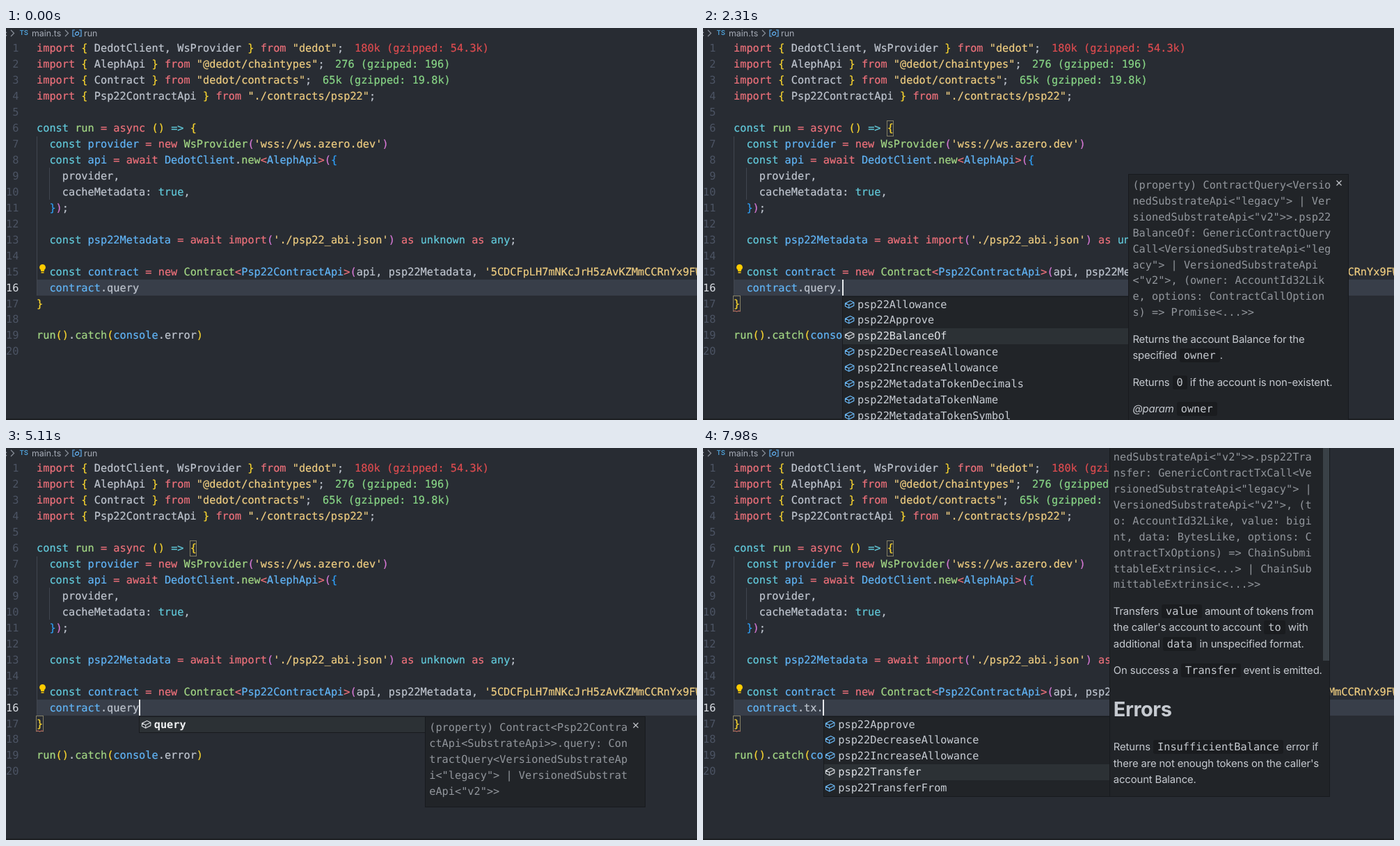
Write an HTML page that moves like this. It is 993 px wide and 564 px high and loops after 8 s.

```html
<!DOCTYPE html>
<html lang="en">
<head>
<meta charset="utf-8">
<title>Contract autocompletion</title>
<style>
html, body { margin: 0; width: 100%; height: 100%; overflow: hidden; background: #282c33; }
#stage { position: relative; width: 993px; height: 564px; overflow: hidden; background: #282c33; color: #bfc5cf;
  font: 15.28px/22.95px "DejaVu Sans Mono", "Liberation Mono", monospace; text-rendering: geometricPrecision; font-variant-ligatures: none; }
#stage div, #stage svg.abs { position: absolute; }
.row, .l { white-space: pre; height: 22.95px; }
.row { left: 44px; -webkit-text-stroke: .2px; }
.num { left: 0; width: 18.4px; text-align: right; color: #4c5464; }
.num.on { color: #d8dce2; }
i { font-style: normal; }
.r { color: #ee717b; } .c { color: #62cadb; } .b { color: #61b5f7; } .g { color: #a2d684; }
.y { color: #efcd80; } .o { color: #fad62f; } .p { color: #d678d5; } .u { color: #2f9ff6; }
.bad { color: #de4c50; } .ok { color: #88d686; }
.guide { width: 1px; background: #41464f; }
#now { left: 44px; right: 0; top: 362px; height: 23px; background: #383e49; }
#word { left: 145.2px; width: 46px; top: 362px; height: 23px; background: #484f5c; }
.match { width: 8.5px; height: 21px; border: 1px solid #858065; }
#caret { width: 2px; height: 22.5px; top: 362.3px; background: #e8eaed; }
#edge { left: 0; right: 0; bottom: 0; height: 2px; background: #1c1e22; }
#crumbs { left: 0; top: 0; height: 15px; font: 12.4px/15px Inter, "Open Sans", sans-serif; color: #a5abb6; }
#crumbs div { white-space: pre; top: 0; }
.pop { background: #212428; border: 1px solid #181a1e; box-sizing: border-box; overflow: hidden; }
#list { top: 385.5px; width: 412px; }
.item { left: 0; width: 100%; height: 22.95px; color: #c8cdd4; white-space: pre; }
.item.on { background: #2c3135; color: #dfe2e6; }
.item div { left: 20.5px; top: 0; }
.item svg { position: absolute; left: 1.5px; top: 3px; fill: none; stroke: #6bb8f5; stroke-width: 1.2; stroke-linejoin: round; }
.item.on svg { stroke: #d5d8dc; }
.item b { color: #f0f1f3; }
#info { width: 317px; }
.l { left: 5px; color: #c6cad0; font: 14.9px/22.95px Inter, "Open Sans", sans-serif; letter-spacing: -.15px; }
.l.sig { color: #92969c; font: inherit; letter-spacing: 0; }
.l.head { font-weight: 700; font-size: 29px; letter-spacing: -.5px; }
.l code { font: 15.28px "DejaVu Sans Mono", monospace; letter-spacing: 0; padding: 1px 6px; border-radius: 3px; background: #1a1c1f; }
#bar { right: 0; top: 0; width: 9px; background: #3a4147; }
</style>
</head>
<body>
<div id="stage">
  <div id="now"></div>
  <div id="word"></div>
  <div class="guide" style="left:44px;top:155.5px;height:229px"></div>
  <div class="guide" style="left:62px;top:201px;height:46px"></div>
  <div id="code"></div>
  <div class="match" style="left:263.7px;top:132.5px"></div>
  <div class="match" style="left:43px;top:385px"></div>
  <svg class="abs" id="squiggle" style="left:43px;top:404px" width="11" height="6" fill="none" stroke="#e0484d" stroke-opacity=".7"><path d="M0 4.500l2.500-2.500 3 2.500 3-2.500 2.500 2.500"/></svg>
  <svg class="abs" id="bulb" style="left:46.500px;top:339px" width="11" height="15"><path d="M5.500 1a4.400 4.400 0 0 0-2.500 8v2h5V9a4.400 4.400 0 0 0-2.500-8z" fill="#ffcc00"/><path d="M3.500 11.800h4v2h-4z" fill="#d9ae12"/></svg>
  <div id="crumbs">
    <div style="left:-5px">c</div>
    <div style="left:19.5px;color:#4f9fd6;font-size:9.5px;font-weight:600">TS</div>
    <div style="left:37px">main.ts</div>
    <div style="left:112px">run</div>
    <svg class="abs" style="left:0;top:0" width="120" height="15" fill="none" stroke="#8a909b" stroke-width="1.2">
      <path d="M7 3l4.5 4.5L7 12M85 3l4.5 4.5L85 12"/>
      <path stroke="#61afef" d="M99 3h-3v9h3M105 3h3v9h-3M99.5 7.5l2.5-2 2.5 1v2.5l-2.5 1.5-2.5-1z"/>
    </svg>
  </div>
  <div id="edge"></div>
  <div id="caret"></div>
  <div id="list" class="pop"></div>
  <div id="info" class="pop"></div>
</div>
<script>
const $ = id => document.getElementById(id);
const CH = 9.2, ROW = 22.95, TOP = 18.3, LOOP = 8000, LAG = 65;
const esc = s => s.replace(/&/g, '&amp;').replace(/</g, '&lt;');

// [x:text] paints text with colour class x
const paint = s => esc(s).replace(/\[(\w+):(.*?)\]/g, '<i class="$1">$2</i>');
const imp = (name, path) => `[r:import] [o:{] ${name} [o:}] [r:from] [y:"${path}"];`;
const lines = [
  imp('DedotClient, WsProvider', 'dedot'),
  imp('AlephApi', '@dedot/chaintypes'),
  imp('Contract', 'dedot/contracts'),
  imp('Psp22ContractApi', './contracts/psp22'),
  '',
  '[c:const] [g:run] [r:=] [r:async] [o:()] [c:=>] [o:{]',
  "  [c:const] [b:provider] [r:=] [r:new] [g:WsProvider][p:(][y:'wss://ws.azero.dev'][p:)]",
  '  [c:const] [b:api] [r:=] [r:await] [b:DedotClient].[g:new][r:<][b:AlephApi][r:>][p:(][u:{]',
  '    provider,',
  '    cacheMetadata: [c:true],',
  '  [u:}][p:)];',
  '',
  "  [c:const] [b:psp22Metadata] [r:=] [r:await] [r:import][p:(][y:'./psp22_abi.json'][p:)] [r:as] [c:unknown] [r:as] [c:any];",
  '',
  "  [c:const] [b:contract] [r:=] [r:new] [g:Contract][r:<][b:Psp22ContractApi][r:>][p:(]api, psp22Metadata, [y:'5CDCFpLH7mNKcJrH5zAvKZMmCCRnYx9FW]",
  '',
  '[o:}]',
  '',
  '[g:run][o:()].[g:catch][o:(][b:console].error[o:)]',
  ''
];
const sizes = [[501, 'bad', '180k (gzipped: 54.3k)'], [473, 'ok', '276 (gzipped: 196)'], [455, 'ok', '65k (gzipped: 19.8k)']];

$('code').innerHTML = lines.map((s, i) => {
  const y = `top:${TOP + i * ROW}px`;
  return `<div class="num${i === 15 ? ' on' : ''}" style="${y}">${i + 1}</div>` +
    `<div class="row" style="${y}"${i === 15 ? ' id="typed"' : ''}>${paint(s)}</div>`;
}).join('') + sizes.map(([x, c, s], i) =>
  `<div class="row ${c}" style="left:${x}px;top:${TOP + i * ROW}px">${s}</div>`).join('');

// Documentation texts
const API = 'VersionedSubstrateApi<"legacy"> | VersionedSubstrateApi<"v2">';
const EX = 'ChainSubmittableExtrinsic<...>';
const param = (...names) => names.map(n => '\n\n*@param* `' + n + '`').join('');
const zero = (who, name) => '\n\nReturns `Zero' + name + 'Address` error if\n' + who + "'s address is zero.";
const zeros = zero('sender', 'Sender') + zero('recipient', 'Recipient');
const emitted = '\n\nAn `Approval` event is emitted.\n\n#Errors';
const change = verb => verb + ' by `delta-value` the\nallowance granted to `spender` by\nthe caller.' + emitted;
const text = {
  Allowance: 'Returns the amount which `spender`\nis still allowed to withdraw from `owner`.\n\nReturns `0` if no allowance has been set.' + param('owner', 'spender'),
  Approve: "Allows `spender` to withdraw from the\ncaller's account multiple times, up to the\n`value` amount.\n\nIf this function is called again it overwrites\nthe current allowance with `value`." + emitted + zeros + param('spender', 'value'),
  BalanceOf: 'Returns the account Balance for the\nspecified `owner`.\n\nReturns `0` if the account is non-existent.' + param('owner'),
  DecreaseAllowance: change('Decreases') + '\n\nReturns `InsufficientAllowance` error\nif there are not enough tokens allowed\nby owner for `spender`.' + zeros + param('spender', 'deltaValue'),
  IncreaseAllowance: change('Increases') + zeros + param('spender', 'deltaValue'),
  MetadataTokenDecimals: 'Returns the token decimals.',
  MetadataTokenName: 'Returns the token name.',
  MetadataTokenSymbol: 'Returns the token symbol.',
  TotalSupply: 'Returns the total token supply.',
  Transfer: "Transfers `value` amount of tokens from\nthe caller's account to account `to` with\nadditional `data` in unspecified format.\n\nOn success a `Transfer` event is emitted.\n\n#Errors\n\nReturns `InsufficientBalance` error if\nthere are not enough tokens on the caller's\naccount Balance." + zeros,
  TransferFrom: ''
};
const ID = ': AccountId32Like, ', delta = 'spender' + ID + 'deltaValue: bigint, ';
const args = {
  Allowance: 'owner' + ID + 'spender' + ID, Approve: 'spender' + ID + 'value: bigint, ', BalanceOf: 'owner' + ID,
  DecreaseAllowance: delta, IncreaseAllowance: delta, Transfer: 'to' + ID + 'value: bigint, data: BytesLike, '
};
const sigs = {
  query: n => `(property) ContractQuery<${API}>.psp22${n}: GenericContractQueryCall<${API}, (${args[n] || ''}options: ContractCallOptions) => Promise<...>>`
    .replace('<"v2">, (owner: AccountId32Like, options: ContractCallOptions', '\n<"v2">, (owner: AccountId32Lik\ne, options: ContractCallOption\ns'),
  tx: n => `(property) ContractTx<${API}>.psp22${n}: GenericContractTxCall<${API}, (${args[n] || ''}options: ContractTxOptions) => ${EX} | ${EX}>`,
  member: n => `(property) Contract<Psp22ContractApi<SubstrateApi>>.${n}: Contract${n === 'tx' ? 'Tx' : 'Query'}<${API}>`
};
const names = {
  query: Object.keys(text),
  tx: ['Approve', 'DecreaseAllowance', 'IncreaseAllowance', 'Transfer', 'TransferFrom']
};
const txBars = [333, 312, 322, 305];

// Breaks a signature every 31 characters; a space at the break hangs
const wrap = s => s.split('\n').flatMap(part => {
  const out = [];
  while (part) { out.push(part.slice(0, 31)); part = part.slice(31).trimStart(); }
  return out;
});
const inline = s => esc(s).replace(/`(.*?)`/g, '<code>$1</code>').replace(/\*(.*?)\*/g, '<em>$1</em>');

function layout(sig, body) {
  let y = 16, html = '', head = false;
  const put = (s, c) => { html += `<div class="l ${c}" style="top:${y - 11.6}px">${s}</div>`; };
  wrap(sig).forEach((s, i) => { if (i) y += 22.9; put(esc(s), 'sig'); });
  for (const p of body ? body.split('\n\n') : []) {
    if (p[0] === '#') { y += 55.5; put(p.slice(1), 'head'); head = true; continue; }
    y += head ? 54.5 : 38.6;
    head = false;
    p.split('\n').forEach((s, i) => { if (i) y += 23.3; put(inline(s), ''); });
  }
  return { html, end: y };
}

// [start, typed text, popup, selected row]
const steps = [
  [0, 'query'], [1260, 'query.'],
  ...[1330, 2030, 2240, 2520, 2800, 3010, 3290, 3570, 4270].map((t, i) => [t, 'query.', 'query', i]),
  [4690, 'query.'],
  ...['query', 'quer', 'que', 'qu', 'q'].map((s, i) => [5110 + 70 * i, s, 'member', 'query']),
  [5460, ''], [5880, 't'], [5950, 't', 'member', 'tx'], [6230, 'tx', 'member', 'tx'], [6510, 'tx.'],
  ...[6580, 7140, 7490, 7770].map((t, i) => [t, 'tx.', 'tx', i])
];
const caretOn = [[630, 1120], [1260, 1820], [2310, 2870], [3360, 3920], [4480, 4970], [5110, 7000], [7490, LOOP]];
const at = t => steps.findLast(s => s[0] <= t) || steps[0];
const show = (el, on) => { el.style.visibility = on ? 'visible' : 'hidden'; };
const cube = '<svg width="15.3" height="15.3" viewBox="0 0 16 16"><path d="M1.5 6.4L9 2.5l5.5 2.7v4.6L7 13.5l-5.500-2.700zL7 8.800l7.500-3.600M7 8.800v4.700"/></svg>';

function drawList(x, typed, kind, sel) {
  const n = typed.length;
  const labels = kind === 'member' ? [`<b>${sel.slice(0, n)}</b>${sel.slice(n)}`] : names[kind].map(s => 'psp22' + s);
  $('list').style.left = x + 'px';
  $('list').style.height = labels.length * ROW + 2 + 'px';
  $('list').innerHTML = labels.map((s, i) =>
    `<div class="item${kind === 'member' || i === sel ? ' on' : ''}" style="top:${i * ROW}px">${cube}<div>${s}</div></div>`).join('');
}

function drawInfo(x, kind, sel) {
  const member = kind === 'member', name = member ? sel : names[kind][sel];
  const body = member ? '' : text[name];
  const { html, end } = layout(sigs[kind](name), body);
  const top = member ? 386 : kind === 'tx' ? -49 : Math.max(-49, 548 - end);
  const bottom = member ? 516.5 : kind === 'tx' ? 502 : 641;
  const barEnd = kind === 'tx' ? txBars[sel] : top === -49 ? 480 : 0;
  const more = kind === 'query' ? layout(sigs.query(name), body + param('options')).html : html;
  const s = $('info').style;
  s.left = x + 411 + 'px';
  s.top = top + 'px';
  s.height = bottom - top + 'px';
  $('info').innerHTML = more +
    '<svg class="abs" style="right:9px;top:8px" width="8" height="8" stroke="#c5c8cc" stroke-width="1.2"><path d="M.5 .5l7 7M7.5 .5l-7 7"/></svg>' +
    (barEnd ? `<div id="bar" style="height:${barEnd - top}px"></div>` : '');
}

const marks = document.querySelectorAll('.match');
let last = '';
function draw(t) {
  const [, typed, kind, sel] = at(t), old = at(t - LAG);
  const info = kind === 'member' ? sel : kind && old[2] === kind ? old[3] : null;
  const x = 44 + CH * (11 + typed.length);
  show($('caret'), caretOn.some(([a, b]) => t >= a && t < b));
  show($('word'), t >= 840 && t < 1260);
  show($('squiggle'), t >= 1680);
  show($('bulb'), t < 5180 || t >= 7140);
  marks.forEach(m => show(m, t >= 630));
  const key = [typed, kind, sel, info].join();
  if (key === last) return;
  last = key;
  $('typed').innerHTML = paint('  [b:contract].') + typed;
  $('caret').style.left = x - .6 + 'px';
  show($('list'), kind);
  show($('info'), info !== null);
  if (kind) drawList(x, typed, kind, sel);
  if (info !== null) drawInfo(x, kind, info);
}

const start = performance.now();
function tick() {
  draw((performance.now() - start) % LOOP);
  requestAnimationFrame(tick);
}
tick();
</script>
</body>
</html>
```
